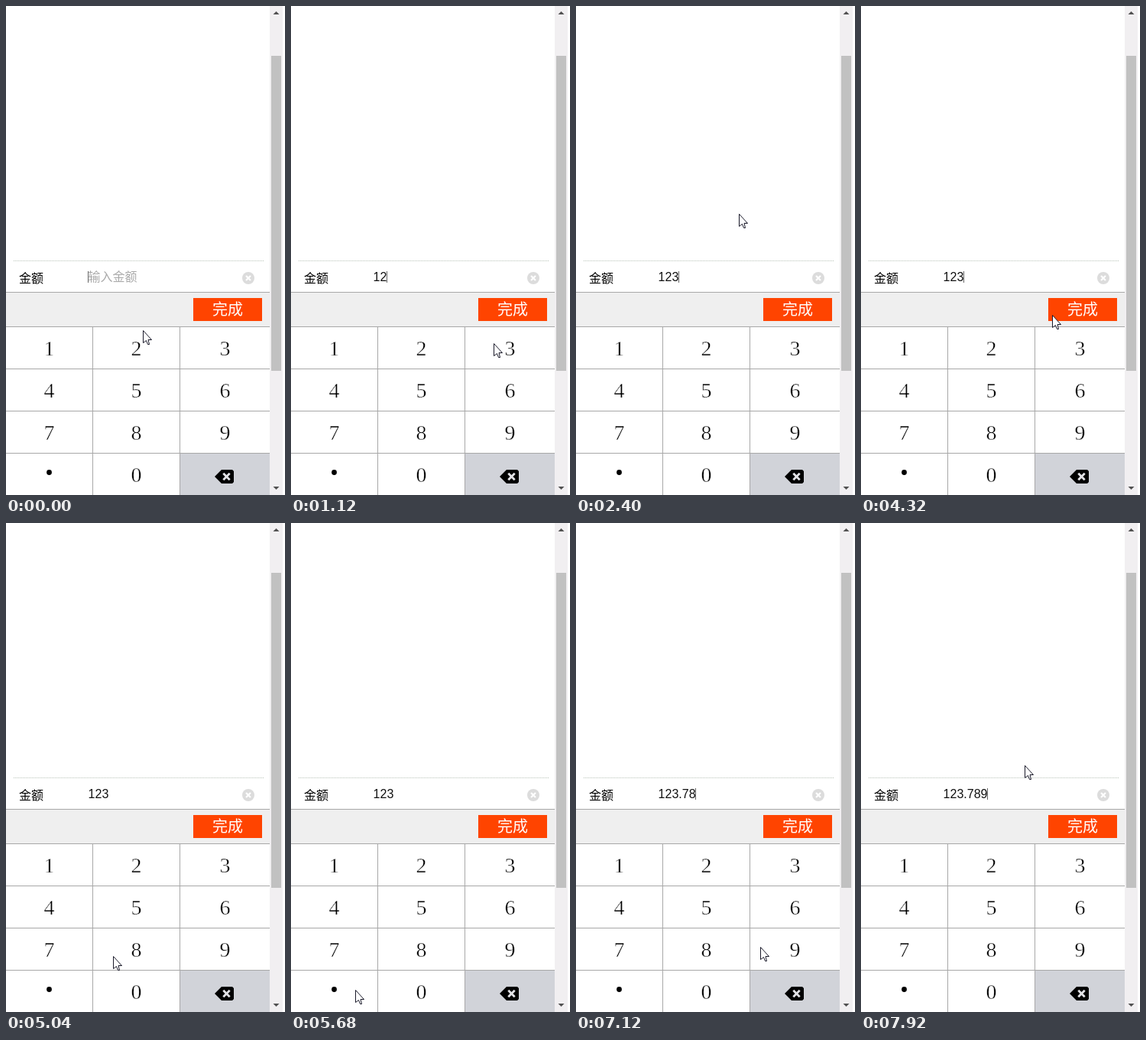
Animation of 365 by 638 pixels, one loop 8000 ms. Source, as an HTML page with a canvas:

```html
<!DOCTYPE html>
<html lang="zh-CN">
<head>
<meta charset="utf-8">
<title>Amount keypad</title>
<style>
html, body { margin: 0; width: 100%; height: 100%; overflow: hidden; background: #fff; }
canvas { display: block; }
</style>
</head>
<body>
<canvas id="stage" width="365" height="638"></canvas>
<script>
const ctx = document.getElementById('stage').getContext('2d');
const LOOP = 8000, STEP = 80, TRAVEL = 240, LEAD = 200, PRESS = 120, BLINK = 530;
const CLOSE = 2560, OPEN = 3920, SCROLL = 75;
const CJK = '"Noto Sans CJK SC", "Noto Sans CJK", sans-serif';
const ARIAL = '16px "Liberation Sans", Arial, sans-serif';
const SERIF = '28px "Liberation Serif", "Times New Roman", serif';
const GREY = '#d1d3d9', LINE = '#a8a8a8';
const KEYS = '123456789.0<';

// A key tapped at a time, or a place the pointer reaches at that time.
const tap = (time, key) => {
  const i = KEYS.indexOf(key);
  return { time, key, arrive: time - LEAD, x: 84 + 90.5 * (i % 3), y: 440 + 56.5 * Math.floor(i / 3) };
};
const rest = (time, x, y) => ({ time, arrive: time, x, y });
const moves = [
  rest(0, 179, 423), tap(400, '1'), tap(800, '2'), tap(1320, '3'),
  rest(2240, 213, 271), rest(3520, 232, 431), rest(4320, 250, 403), rest(5040, 140, 565),
  tap(5840, '.'), tap(6400, '7'), tap(6840, '8'), tap(7400, '9'), rest(7840, 214, 316)
];
const taps = moves.filter(m => m.key);

function rect(x, y, w, h, color) {
  ctx.fillStyle = color;
  ctx.fillRect(x, y, w, h);
}

function text(s, x, y, font, color, align = 'left') {
  ctx.font = font;
  ctx.fillStyle = color;
  ctx.textAlign = align;
  ctx.fillText(s, x, y);
}

function shape(points, color) {
  ctx.beginPath();
  points.forEach(([x, y]) => ctx.lineTo(x, y));
  ctx.closePath();
  ctx.fillStyle = color;
  ctx.fill();
}

function disc(x, y, r, color) {
  ctx.beginPath();
  ctx.arc(x, y, r, 0, Math.PI * 2);
  ctx.fillStyle = color;
  ctx.fill();
}

function cross(x, y, r, color, width) {
  ctx.beginPath();
  for (const s of [-1, 1]) {
    ctx.moveTo(x - r, y - r * s);
    ctx.lineTo(x + r, y + r * s);
  }
  ctx.strokeStyle = color;
  ctx.lineWidth = width;
  ctx.stroke();
}

function dotted(x1, x2, y) {
  for (let x = x1; x < x2; x += 2) rect(x, y, 1, 1, '#b9c4b9');
}

function pointerAt(t) {
  let { x, y } = moves[0];
  for (let i = 1; i < moves.length; i++) {
    const m = moves[i];
    const from = Math.max(moves[i - 1].time, m.arrive - TRAVEL);
    const k = Math.min(1, Math.max(0, (t - from) / (m.arrive - from)));
    const e = k * k * (3 - 2 * k);
    x += (m.x - x) * e;
    y += (m.y - y) * e;
  }
  return [Math.floor(x), Math.floor(y)];
}

function drawRow(t, open) {
  const dy = open ? 0 : SCROLL, right = open ? 337 : 354;
  const typed = taps.filter(p => p.time <= t);
  const value = typed.map(p => p.key).join('');
  dotted(10, right, 332 + dy);
  if (!open) dotted(10, right, 452);
  text('金额', 17, 361 + dy, '16px ' + CJK, '#000');
  if (value) text(value, 107.6, 359 + dy, ARIAL, '#111');
  else text('输入金额', 107.5, 359 + dy, '16px ' + CJK, '#aaa');
  disc(right - 20, 355 + dy, 8, '#dcdcdc');
  cross(right - 20, 355 + dy, 3, '#fff', 2.2);

  const last = typed.length ? typed[typed.length - 1].time : 0;
  const since = t - (t >= OPEN ? Math.max(last, OPEN + 100) : last);
  if (open && since >= 0 && since % (2 * BLINK) < BLINK) {
    ctx.font = ARIAL;
    const x = value ? 108 + Math.floor(ctx.measureText(value).width) : 107;
    rect(x, 346, 1, 15, '#666');
  }
}

function drawKey(key, i, pressed) {
  const c = i % 3, x = c * 114, y = 419 + Math.floor(i / 3) * 55;
  const w = c < 2 ? 113 : 117, mid = x + w / 2;
  const color = pressed || key === '<' ? GREY : '#fff';
  rect(x, y, w, 54, color);
  if (key === '.') {
    disc(mid, y + 25 - .5 + 55 * 0, 3.4, '#000');
  } else if (key === '<') {
    shape([[273, 614], [282, 605], [296, 605], [298, 607], [298, 621], [296, 623], [282, 623]], '#000');
    cross(288.5, 614, 4.2, '#e4e4e8', 2.8);
  } else {
    text(key, mid, y + 37, SERIF, '#000', 'center');
    // Thin the strokes.
    ctx.strokeStyle = color;
    ctx.lineWidth = .5;
    ctx.strokeText(key, mid, y + 37);
  }
}

function drawKeypad(t) {
  const down = taps.find(p => t >= p.time - PRESS && t < p.time);
  rect(0, 373, 345, 265, LINE);
  rect(0, 374, 345, 44, '#efefef');
  rect(245, 381, 90, 30, '#ff4400');
  text('完成', 290, 403, '20px ' + CJK, '#fff', 'center');
  [...KEYS].forEach((key, i) => drawKey(key, i, down && down.key === key));
}

function drawScrollbar() {
  rect(345, 0, 17, 638, '#f1eff1');
  rect(347, 65, 13, 411, '#c1c1c1');
  shape([[349.5, 11], [353.5, 7], [357.5, 11]], '#505050');
  shape([[349.5, 627], [353.5, 631], [357.5, 627]], '#505050');
}

function drawPointer([x, y]) {
  const outline = [[0, 0], [0, 16], [4, 13], [6, 18], [8, 18], [6.5, 12], [11, 12]];
  shape(outline.map(([a, b]) => [x + a + .5, y + b + .5]), '#fff');
  ctx.strokeStyle = '#1a1a2a';
  ctx.lineWidth = 1;
  ctx.stroke();
}

function draw(now) {
  const t = Math.floor((now % LOOP) / STEP) * STEP;
  const open = t < CLOSE || t >= OPEN;
  rect(0, 0, 365, 638, '#fff');
  drawRow(t, open);
  if (open) {
    drawKeypad(t);
    drawScrollbar();
  }
  drawPointer(pointerAt(t));
}

const start = performance.now();
function tick() {
  draw(performance.now() - start);
  requestAnimationFrame(tick);
}
tick();
</script>
</body>
</html>
```
